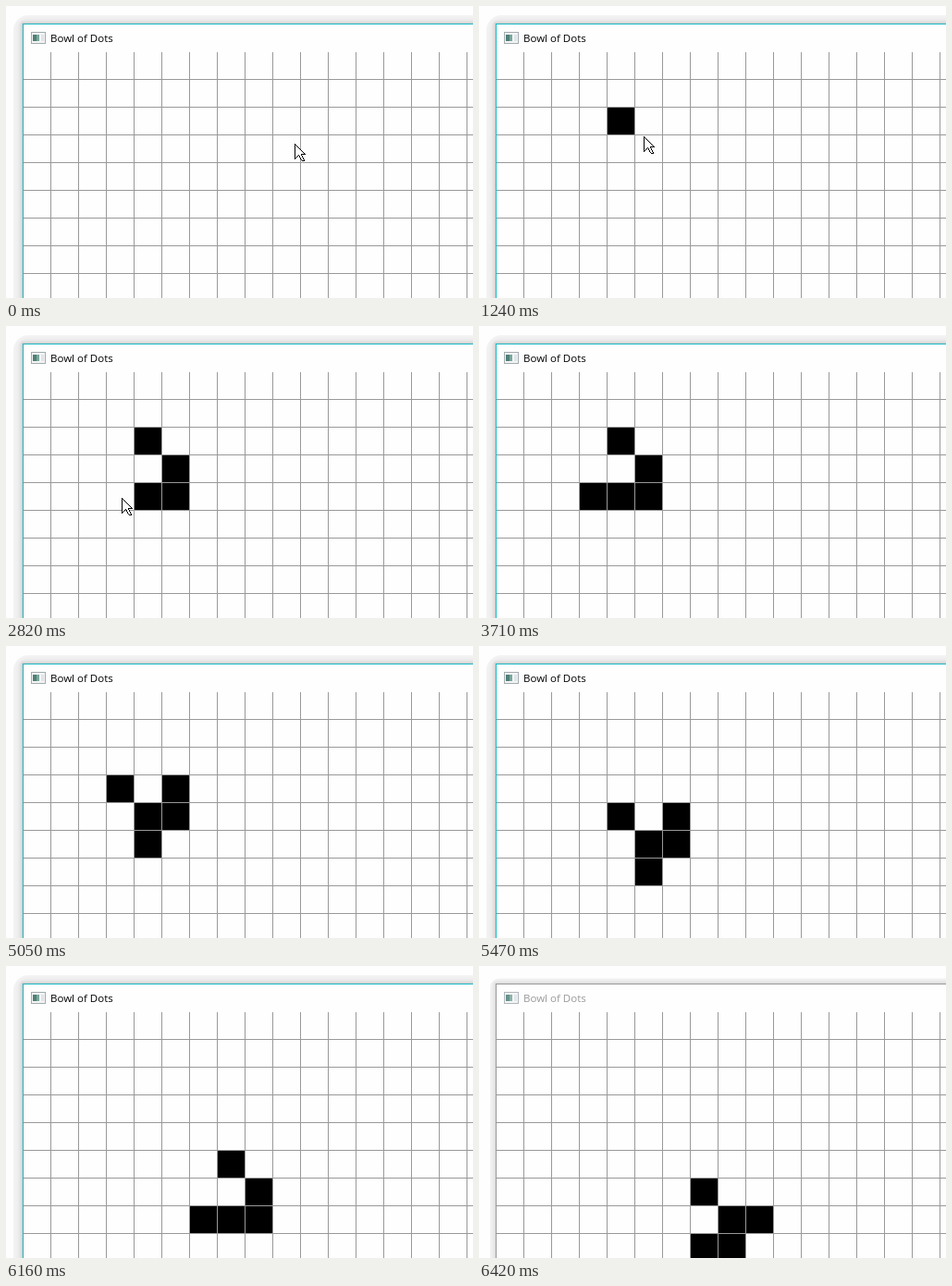
Write an HTML page that moves like this. It is 505 by 316 pixels and loops after 6520 ms.

```html
<!DOCTYPE html>
<html lang="en">
<head>
<meta charset="utf-8">
<title>Bowl of Dots</title>
<style>
  html, body { margin: 0; width: 100%; height: 100%; overflow: hidden; background: #fff; }
  svg { display: block; }
  text { font: 11.5px "Open Sans", "Noto Sans", sans-serif; }
  .sharp { shape-rendering: crispEdges; }
</style>
</head>
<body>
<svg width="505" height="316" viewBox="0 0 505 316">
  <rect width="505" height="316" fill="#fefefe"/>
  <g id="shadow"></g>
  <g class="sharp">
    <rect x="18" y="19" width="487" height="297" fill="#fefefe"/>
    <path id="border" fill="none" d="M18.5 316V19.5H505"/>
    <path id="grid" fill="none" stroke="#999"/>
    <g id="icon">
      <rect x="27.5" y="28.5" width="15" height="12" fill="#f4f4f4" stroke="#a3abb0"/>
      <rect x="29" y="31" width="4" height="7" fill="#4f8078"/>
      <rect x="33" y="31" width="3" height="7" fill="#78a89c"/>
      <rect x="38" y="31" width="3" height="7" fill="#dfe4e8"/>
    </g>
    <path id="cells"/>
    <g id="cursor">
      <path d="M0 0H.5L12 11.5V12H8L11 18L10 19H8.2L7 18L4.4 12.8L0 17.2Z"/>
      <path fill="#fff" d="M1 1.5L10.5 11H6.5L10 18H8L5 12H4.2L1.2 15H1Z"/>
    </g>
  </g>
  <text id="title" x="48" y="39">Bowl of Dots</text>
</svg>
<script>
const LOOP = 6520, BLUR_AT = 6420;
const CELL = 30, LEFT = 18, TOP = 49, COLS = 17, ROWS = 12;
const el = id => document.getElementById(id);

// The pointer glides to each stop, clicks the cell under its tip, then moves on.
const POINTER_STEP = 120;
const stops = [
  { x: 312, y: 149, arrive: 0, glide: 0 },
  { x: 160, y: 125, arrive: 720, glide: 720, click: 1000 },
  { x: 179, y: 155, arrive: 1480, glide: 480, click: 1600 },
  { x: 182, y: 186, arrive: 1870, glide: 240, click: 2020 },
  { x: 160, y: 182, arrive: 2330, glide: 120, click: 2700 },
  { x: 125, y: 186, arrive: 2820, glide: 120, click: 3350 },
  { x: 380, y: 330, arrive: 3710, glide: 360 }
];

const easeOut = (u, power) => 1 - (1 - u) ** power;
const mix = (a, b, u) => Math.round(a + (b - a) * u);

function pointerAt(t) {
  const i = stops.findLastIndex(stop => stop.arrive - stop.glide <= t);
  const from = stops[i - 1], to = stops[i];
  const elapsed = t - to.arrive + to.glide;
  const u = Math.min(1, Math.floor(elapsed / POINTER_STEP) * POINTER_STEP / to.glide);
  return [mix(from.x, to.x, easeOut(u, 4)), mix(from.y, to.y, easeOut(u, 1.1))];
}

const cellUnder = ({ x, y }) =>
  [Math.floor((x - LEFT) / CELL), Math.floor((y - TOP) / CELL)];
const clickedBy = t => stops.filter(stop => stop.click <= t).map(cellUnder);

function evolve(cells) {
  const alive = new Set(cells.map(String));
  const next = [];
  for (let c = 0; c < COLS; c++) {
    for (let r = 0; r < ROWS; r++) {
      let near = 0;
      for (let dc = -1; dc <= 1; dc++)
        for (let dr = -1; dr <= 1; dr++)
          if ((dc || dr) && alive.has(`${c + dc},${r + dr}`)) near++;
      if (near === 3 || (near === 2 && alive.has(`${c},${r}`))) next.push([c, r]);
    }
  }
  return next;
}

// The screen refreshes every 4.5 ticks, while four generations pass in three refreshes.
const RUN_AT = 5050, TICK = 30, TICKS_PER_REFRESH = 4.5;
function generationAt(t) {
  if (t < RUN_AT) return 0;
  const refresh = Math.floor(Math.floor((t - RUN_AT) / TICK) / TICKS_PER_REFRESH);
  return 1 + Math.ceil(refresh * 4 / 3);
}

const generations = [clickedBy(LOOP)];
while (generations.length <= generationAt(LOOP)) generations.push(evolve(generations.at(-1)));

const cellsAt = t => t < RUN_AT ? clickedBy(t) : generations[generationAt(t)];

// Nested rounded layers, darkest next to the window.
function shadowLayers(depth, edgeShade) {
  let layers = "";
  for (let d = depth; d > 0; d--) {
    const shade = Math.round(edgeShade + (245 - edgeShade) * (1 - Math.exp((1 - d) / 3)));
    layers += `<rect x="${LEFT - d}" y="${19 - d * .9}" width="600" height="400"
      rx="${d * 1.6}" fill="rgb(${shade},${shade},${shade})"/>`;
  }
  return layers;
}

const focused = { title: "#000", border: "#18b9c4", icon: 1, shadow: shadowLayers(10, 208) };
const blurred = { title: "#999", border: "#999", icon: .85, shadow: shadowLayers(6, 222) };

let look;
function applyLook(next) {
  if (look === next) return;
  look = next;
  el("title").setAttribute("fill", look.title);
  el("border").setAttribute("stroke", look.border);
  el("icon").setAttribute("opacity", look.icon);
  el("shadow").innerHTML = look.shadow;
}

let lines = "";
for (let x = LEFT + CELL + .5; x < 505; x += CELL) lines += `M${x} 50V316`;
for (let y = TOP + CELL + .5; y < 316; y += CELL) lines += `M19 ${y}H505`;
el("grid").setAttribute("d", lines);

function draw(t) {
  el("cursor").setAttribute("transform", `translate(${pointerAt(t)})`);
  el("cells").setAttribute("d", cellsAt(t)
    .map(([c, r]) => `M${LEFT + 1 + c * CELL} ${TOP + 1 + r * CELL}h29v29h-29z`).join(""));
  applyLook(t < BLUR_AT ? focused : blurred);
}

const start = performance.now();
function tick() {
  draw((performance.now() - start) % LOOP);
  requestAnimationFrame(tick);
}
tick();
</script>
</body>
</html>
```
